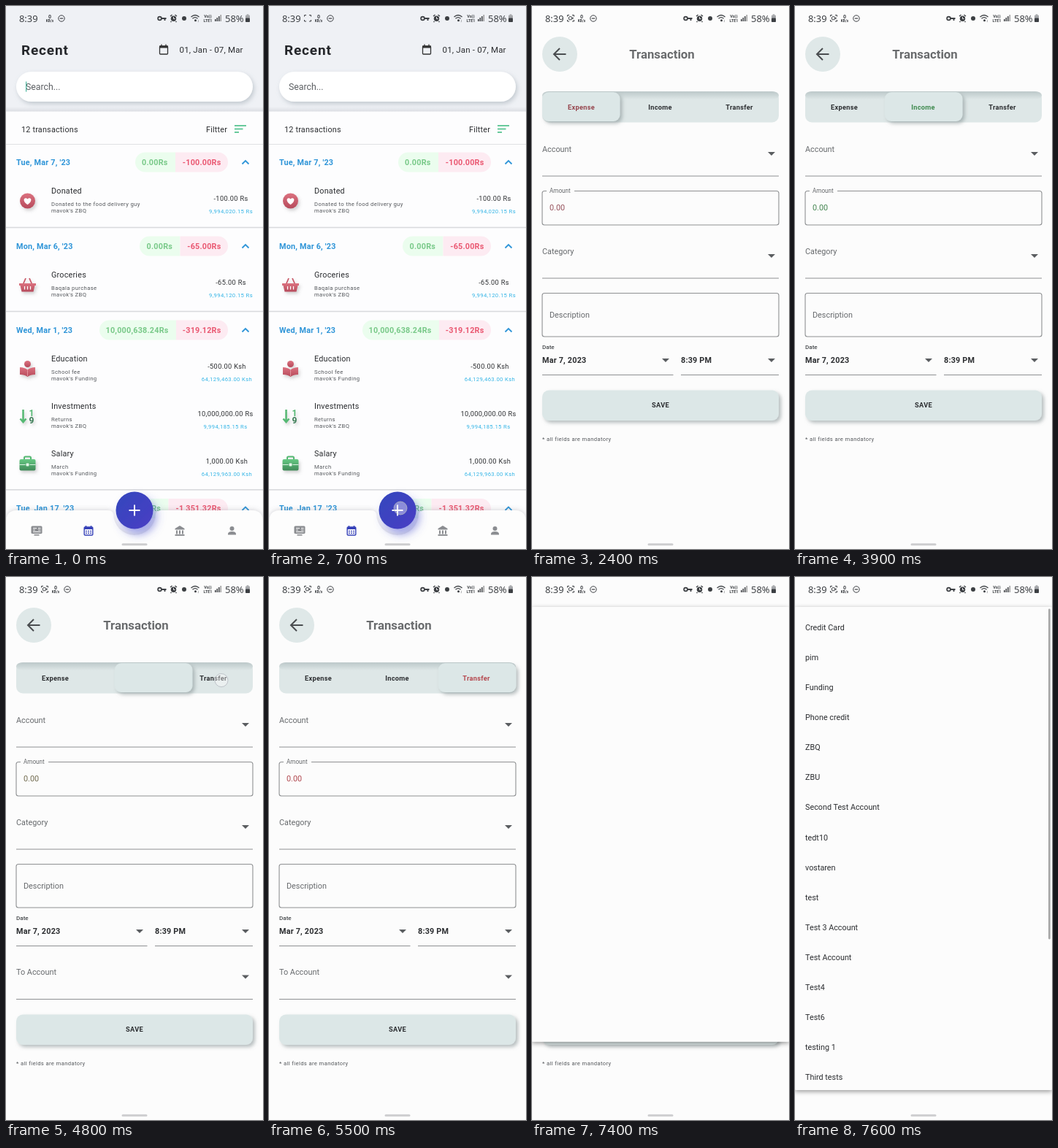
Recreate the animation shown at these times as an HTML page. Size 352 by 744 pixels, loop 8000 ms.

```html
<!DOCTYPE html>
<html lang="en">
<head>
<meta charset="utf-8">
<title>Expense tracker</title>
<style>
html, body { margin: 0; width: 100%; height: 100%; overflow: hidden; background: #fcfcfc; }
svg { display: block; width: 352px; height: 744px; font-family: Roboto, sans-serif; }
text { white-space: pre; }
.home, .form, .pill, .live, .hit, .kb, .crop, .rec, .dnd, .caret, .amount, .extra, .foot, .menu, .sheet, .item {
  animation: 8s linear infinite both;
}
.kb, .crop, .rec, .dnd, .caret, .extra, .foot, .hit { animation-timing-function: step-end; }

/* page push */
.home { animation-name: home; }
.form { animation-name: form; }
@keyframes home {
  0%, 9% { transform: none; animation-timing-function: cubic-bezier(.35,.91,.33,.97); }
  12.75%, 100% { transform: translateX(-117px); }
}
@keyframes form {
  0%, 9% { transform: translateX(358px); animation-timing-function: cubic-bezier(.35,.91,.33,.97); }
  12.75%, 100% { transform: none; }
}

/* status icons swap places */
.kb { animation-name: kb; }
.crop { animation-name: crop; }
.rec { animation-name: rec; }
.dnd { animation-name: dnd; }
.caret { animation-name: caret; }
@keyframes kb {
  0% { transform: translateX(60px); }
  1.25% { transform: translateX(68px); }
  11.875% { transform: translateX(53px); }
  16.875%, 100% { transform: translateX(68px); }
}
@keyframes crop {
  0% { transform: translateX(53px); opacity: 0; }
  1.25% { transform: translateX(53px); opacity: 1; }
  11.875% { transform: translateX(68px); opacity: 1; }
  16.875%, 100% { transform: translateX(53px); opacity: 1; }
}
@keyframes rec { 0% { opacity: 0; } 16.875%, 100% { opacity: 1; } }
@keyframes dnd { 0% { transform: translateX(76px); } 1.25%, 100% { transform: translateX(84px); } }
@keyframes caret { 0% { opacity: 1; } 2.5%, 100% { opacity: 0; } }

/* tab switch */
.pill { animation-name: pill; }
@keyframes pill {
  0%, 38.75% { transform: none; animation-timing-function: ease-in-out; }
  42.125%, 58.875% { transform: translateX(109px); animation-timing-function: ease-in-out; }
  62.25%, 100% { transform: translateX(218px); }
}
.live0 { animation-name: live0; }
.live1 { animation-name: live1; }
.live2 { animation-name: live2; }
@keyframes live0 { 0%, 38.75% { opacity: 1; } 39.5%, 100% { opacity: 0; } }
@keyframes live1 { 0%, 41.25% { opacity: 0; } 42.5%, 58.75% { opacity: 1; } 59.5%, 100% { opacity: 0; } }
@keyframes live2 { 0%, 61.25% { opacity: 0; } 62.5%, 100% { opacity: 1; } }
.amount { animation-name: amount; }
@keyframes amount {
  0%, 38.75% { fill: #95505a; }
  42.5%, 58.75% { fill: #438550; }
  61.75%, 100% { fill: #b0474e; }
}
.extra { animation-name: extra; }
.foot { animation-name: foot; }
@keyframes extra { 0% { opacity: 0; } 59.5%, 100% { opacity: 1; } }
@keyframes foot { 0% { transform: none; } 59.5%, 100% { transform: translateY(73px); } }

/* taps */
.hit0 { animation-name: hit0; }
.hit1 { animation-name: hit1; }
.hit2 { animation-name: hit2; }
.hit3 { animation-name: hit3; }
@keyframes hit0 { 0% { opacity: 0; } 7.5% { opacity: 1; } 9.75%, 100% { opacity: 0; } }
@keyframes hit1 { 0% { opacity: 0; } 38.5% { opacity: 1; } 40.625%, 100% { opacity: 0; } }
@keyframes hit2 { 0% { opacity: 0; } 58.75% { opacity: 1; } 61.25%, 100% { opacity: 0; } }
@keyframes hit3 { 0% { opacity: 0; } 88.75% { opacity: 1; } 90.625%, 100% { opacity: 0; } }

/* account menu: fade, grow, then list its rows */
.menu { animation-name: menu; }
.sheet { animation-name: sheet; }
.item { animation-name: item; }
@keyframes menu { 0%, 91% { opacity: 0; } 91.94%, 100% { opacity: 1; } }
@keyframes sheet {
  0%, 91.94% { height: 41px; animation-timing-function: ease; }
  92.875%, 100% { height: 662px; }
}
@keyframes item { 0%, 93% { opacity: 0; } 93.3%, 100% { opacity: 1; } }
</style>
</head>
<body>
<svg id="stage" viewBox="0 0 352 744" xmlns="http://www.w3.org/2000/svg"></svg>
<script>
const INK = '#2b2d30', BLUE = '#2f95d8', RED = '#c95a69', GREEN = '#55b873';

// y is the middle of the capitals
const text = (x, y, str, size, o = {}) =>
  `<text x="${x}" y="${(y + size * .355).toFixed(2)}" font-size="${size}" fill="${o.fill || INK}"` +
  ` font-weight="${o.bold ? 700 : o.weight || 400}" letter-spacing="${o.gap || 0}"` +
  ` text-anchor="${o.at || 'start'}"${o.cls ? ` class="${o.cls}"` : ''}` +
  `${o.font ? ` font-family="${o.font}"` : ''}>${str}</text>`;
const body = (x, y, str, o) => text(x, y, str, 10.8, { gap: .21, ...o });
const tiny = (x, y, str, o) => text(x, y, str, 7.7, { gap: .36, fill: '#55585c', ...o });
const rect = (x, y, w, h, r, fill, more = '') =>
  `<rect x="${x}" y="${y}" width="${w}" height="${h}" rx="${r}" fill="${fill}" ${more}/>`;
const circle = (x, y, r, fill, more = '') => `<circle cx="${x}" cy="${y}" r="${r}" fill="${fill}" ${more}/>`;
const path = (d, fill, more = '') => `<path d="${d}" fill="${fill}" ${more}/>`;
const line = (d, color, w = 1, more = '') => path(d, 'none', `stroke="${color}" stroke-width="${w}" ${more}`);
const at = (x, y, inner, more = '') => `<g transform="translate(${x} ${y})" ${more}>${inner}</g>`;

const shadow = (id, dx, dy, blur, color, alpha) =>
  `<filter id="${id}" x="-40%" y="-60%" width="180%" height="240%">
   <feDropShadow dx="${dx}" dy="${dy}" stdDeviation="${blur}" flood-color="${color}" flood-opacity="${alpha}"/></filter>`;
const ramp = (id, a, b, x2 = 0, y2 = 1) =>
  `<linearGradient id="${id}" x1="0" y1="0" x2="${x2}" y2="${y2}">
   <stop stop-color="${a}"/><stop offset="1" stop-color="${b}"/></linearGradient>`;

const defs = `<defs>
  ${shadow('soft', 2, 3, 3, '#8a98a0', .45)}${shadow('lift', 3, 3, 2.5, '#7d8a8c', .55)}
  ${shadow('glow', 5, 8, 6, '#4a52d0', .5)}${shadow('bar', 0, -1, 3, '#60646c', .25)}
  ${shadow('drop', 0, 2, 3, '#000', .4)}${shadow('icon', 2, 3, 2, '#666', .28)}
  ${ramp('fab', '#3346bd', '#4a3fc4', 1)}${ramp('dent', '#bcc8c9', '#dee7e7')}
  ${ramp('edge', '#eff1f5', '#dcdee3')}${ramp('red', '#dc7280', '#b64a5b')}${ramp('green', '#66c983', '#3f8a58')}
</defs>`;

// status bar
const status = () => {
  const g = '#3c3f43';
  const bars = [3, 5, 7, 9].map((h, i) => rect(286 + i * 2.5, 21 - h, 1.5, h, 0, i < 3 ? g : '#999')).join('');
  return text(18, 17, '8:39', 12.9, { font: "'Noto Sans', sans-serif", fill: g }) +
    `<g class="kb">${text(0, 14.3, '0', 7, { bold: 1, at: 'middle', fill: g })}${text(0, 20.6, 'KB/s', 4.8, { bold: 1, at: 'middle', fill: g })}</g>` +
    `<g class="crop">${line('M-4.5 14.5v-2h2.5M2 12.500h2.500v2M4.500 19v2H2M-2 21h-2.500v-2', g)}` +
    `<g class="rec">${rect(-2.500, 14.700, 4, 4, .8, 'none', `stroke="${g}"`)}${path('M1.500 16.700l2-1.500v3z', g)}</g></g>` +
    `<g class="dnd">${circle(0, 17, 4.2, 'none', `stroke="${g}"`)}${line('M-2.200 17h4.400', g, 1.2)}</g>` +
    circle(210.500, 17, 2.400, 'none', `stroke="${g}" stroke-width="1.700"`) + line('M213 17h6.500M217.500 17v3', g, 1.8) +
    circle(229.500, 17.300, 3.700, g) + line('M225 14l2.500-2M234 14l-2.500-2M226.500 21l-1 1M232.500 21l1 1', g, 1.4) + line('M229.500 15v2.500h2', '#fff', .9) +
    circle(244, 17, 3, g) +
    line('M253.500 15q5.500-5 11 0M255.500 17.200q3.500-3 7 0', g, 1.3) + circle(259.500, 19.800, 1.500, g) + text(262, 20, '↕', 5, { fill: g }) +
    text(276.500, 14, 'Vo))', 5.6, { bold: 1, at: 'middle', fill: g }) + text(276.500, 20.300, 'LTE1', 5.400, { bold: 1, at: 'middle', fill: g }) + bars +
    text(300, 17, '58%', 13, { font: "'Noto Sans', sans-serif", fill: g }) +
    rect(328, 12.500, 6, 9.500, 1, '#a5a7aa') + rect(328, 16.500, 6, 5.500, 1, g) + rect(329.700, 11.300, 2.600, 1.500, 0, '#a5a7aa');
};

// list icons, drawn around 0,0
const icons = {
  heart: circle(0, 0, 10.5, 'url(#red)') + path('M0 5.200C-9-1-3.500-6.500 0-2.500C3.500-6.500 9-1 0 5.200z', '#fff'),
  basket: line('M-6-1L-2.500-9M6-1L2.500-9', RED, 1.800) + path('M-11.500-2h23v3h-1.500l-2 8.500h-16l-2-8.500h-1.500z', 'url(#red)') + line('M-4 2v4.500M0 2v4.500M4 2v4.500', '#fff', 1.3),
  reader: circle(0, -6.500, 4.500, 'url(#red)') + path('M-10.500-2Q-4-2 0 1.500Q4-2 10.500-2V8Q4 8 0 11Q-4 8-10.500 8z', 'url(#red)') + line('M0 2v8', '#e9a4ad', .8),
  sort: line('M-6-9V7M-10 3.500l4 4.500l4-4.500', GREEN, 2.500) + text(5.500, -4.500, '1', 12, { bold: 1, at: 'middle', fill: GREEN }) + text(5.500, 5.500, '9', 12, { bold: 1, at: 'middle', fill: '#3b7d56' }),
  bag: rect(-4.500, -9.500, 9, 7, 1.5, 'none', `stroke="${GREEN}" stroke-width="2"`) + rect(-11, -6, 22, 15.500, 2, 'url(#green)') + line('M-11 1.500h8M3 1.500h8', '#d9f2e0', 1) + rect(-2, -.5, 4, 4, 1, '#e4f6e9'),
};

const chips = (y, x, split, plus, minus) =>
  path(`M${split} ${y - 13.5}H${x + 13.5}a13.500 13.500 0 0 0 0 27H${split}z`, '#ebfdee') +
  path(`M${split} ${y - 13.5}H290.500a13.500 13.500 0 0 1 0 27H${split}z`, '#fdebf2') +
  body(split - 10.5, y, plus, { bold: 1, at: 'end', fill: '#78c988' }) +
  body(294.500, y, minus, { bold: 1, at: 'end', fill: '#ea5872' });

const day = (y, name, ...chip) => body(14, y, name, { bold: 1, fill: BLUE }) + chips(y, ...chip) +
  line(`M323.500 ${y + 2.5}l4.500-4.500l4.500 4.500`, BLUE, 1.800);

const entry = (y, icon, title, note, who, mid, sum, left) =>
  at(29.500, y + 14, icons[icon], 'filter="url(#icon)"') + body(62, y, title) +
  tiny(62, y + 18, note) + tiny(62, y + 27.200, who) +
  text(mid, y + 11, sum, 9.24, { gap: .34, at: 'middle' }) +
  tiny(mid, y + 28.500, left, { at: 'middle', fill: '#35b5e6' });

const rule = y => rect(0, y, 352, 1.6, 0, '#d9dadd');

const navbar = () => {
  const c = '#8b8d91', on = '#3540b8';
  return path('M0 744V707Q0 691 16 691H138Q146 691 147 696A29 29 0 0 0 205 696Q206 691 214 691H336Q352 691 352 707V744z', '#fdfdfd', 'filter="url(#bar)"') +
    circle(176, 691, 25.500, 'url(#fab)', 'filter="url(#glow)"') + line('M168.500 691h15M176 683.500v15', '#fff', 2) +
    at(42, 719, rect(-7.500, -6.500, 15, 10.500, 1.5, c) + rect(-3.500, 5, 7, 1.600, 0, c) + line('M-5-3.500h5M-5-1h3M2-3.500h3.500M2-1h3.500M-5 1.500h10.500', '#fff', 1)) +
    at(113, 719, rect(-5.800, -5, 11.600, 11, 1, 'none', `stroke="${on}" stroke-width="1.400"`) + rect(-6, -5, 12, 3, 0, on) + line('M-3.500-7v3M3.500-7v3', on, 1.4) + line('M-4 .5h8M-4 3.200h8', on, 1.600, 'stroke-dasharray="1.800 1.300"')) +
    at(238, 719, path('M-6.500-3L0-7L6.500-3v1.500h-13z', c) + line('M-4-.5v5M0-.5v5M4-.5v5', c, 2) + rect(-6.500, 5, 13, 1.900, 0, c)) +
    at(309.500, 719, circle(0, -3, 3, c) + path('M-5.500 5.500V4Q-5 1 0 1T5.500 4V5.500z', c));
};

const home = () => `<g class="home">` +
  rect(0, 0, 352, 744, 0, '#fdfdfe') + rect(0, 0, 352, 138, 0, '#eff1f5') + rect(0, 138, 352, 6.500, 0, 'url(#edge)') +
  text(21, 60.500, 'Recent', 19, { bold: 1, gap: .85, fill: '#25272b' }) +
  rect(210.500, 55, 11, 11, 1, 'none', 'stroke="#333" stroke-width="1.300"') + rect(210, 54.500, 12, 3, 0, '#333') + line('M213 52.500v3M219 52.500v3', '#333', 1.3) +
  text(237.500, 60, '01, Jan - 07, Mar', 11.5, { gap: .18 }) +
  rect(14, 90, 324, 41, 20.5, '#fff', 'filter="url(#soft)"') + text(27, 110.500, 'Search...', 12.3, { fill: '#5c5f63' }) +
  rect(27, 103.500, 1.200, 14, 0, '#4fb8a0', 'class="caret"') +
  body(21, 169, '12 transactions') + body(274, 169, 'Filtter') +
  line('M313 164h16M313 168.500h11.500M313 173h6', '#68c99c', 1.800) + rect(0, 189, 352, 1, 0, '#e0e1e4') +
  day(214, "Tue, Mar 7, '23", 177, 232, '0.00Rs', '-100.00Rs') +
  entry(253, 'heart', 'Donated', 'Donated to the food delivery guy', "mavok's ZBQ", 308, '-100.00 Rs', '9,994,020.15 Rs') + rule(302.700) +
  day(329, "Mon, Mar 6, '23", 183, 238.500, '0.00Rs', '-65.00Rs') +
  entry(368, 'basket', 'Groceries', 'Baqala purchase', "mavok's ZBQ", 308, '-65.00 Rs', '9,994,120.15 Rs') + rule(417.700) +
  day(444, "Wed, Mar 1, '23", 128, 233, '10,000,638.24Rs', '-319.12Rs') +
  entry(483, 'reader', 'Education', 'School fee', "mavok's Funding", 302.500, '-500.00 Ksh', '64,129,463.00 Ksh') +
  entry(548, 'sort', 'Investments', 'Returns', "mavok's ZBQ", 300.500, '10,000,000.00 Rs', '9,994,185.15 Rs') +
  entry(613, 'bag', 'Salary', 'March', "mavok's Funding", 302.500, '1,000.00 Ksh', '64,129,963.00 Ksh') + rule(662) +
  day(688.500, "Tue, Jan 17, '23", 167, 222.500, '0.00Rs', '-1,351.32Rs') + navbar() + '</g>';

// form page
const arrow = (x, y) => path(`M${x - 5} ${y - 2.5}h10l-5 5z`, '#5a5d60');
const under = (y, x = 14, end = 338) => rect(x, y, end - x, 1, 0, '#8e9092');
const label = (x, y, str) => text(x, y, str, 10.85, { fill: '#66696c' });
const outline = (y, h) => rect(14, y, 324, h, 3, 'none', 'stroke="#8e9092" stroke-width="1.100"');
const picker = (y, str) => label(14, y, str) + arrow(328, y + 6.5) + under(y + 36.500);

const tabs = () => {
  const names = ['Expense', 'Income', 'Transfer'], mids = [67.5, 175.5, 284], tint = ['#95454d', '#3f8a4f', '#b5474e'];
  const row = f => names.map(f).join('');
  const tab = (n, i, o) => text(mids[i], 138.500, n, 9.24, { bold: 1, gap: .27, at: 'middle', ...o });
  return rect(14, 117, 324, 42.500, 9, '#dee7e7') + rect(14, 117, 324, 11, 9, 'url(#dent)') +
    row((n, i) => tab(n, i)) +
    `<g class="pill">${rect(14, 118, 106.500, 40, 9, '#dce7e7', 'filter="url(#lift)"')}</g>` +
    row((n, i) => tab(n, i, { fill: tint[i], cls: `live live${i}` }));
};

const form = () => `<g class="form">` +
  rect(0, 0, 360, 744, 0, '#fcfcfc') + circle(38, 66, 24, '#dfe8e8') +
  line('M46.500 66H30.500M38 58l-8 8l8 8', '#4a4d50', 2) +
  text(178, 66, 'Transaction', 16.8, { bold: 1, at: 'middle', fill: '#696b6d' }) + tabs() +
  picker(196, 'Account') +
  outline(253.500, 46.500) + rect(20, 250, 38, 7, 0, '#fcfcfc') + text(24, 253, 'Amount', 8.15, { fill: '#66696c' }) +
  text(24, 276, '0.00', 10.8, { cls: 'amount' }) +
  picker(336, 'Category') + outline(393.500, 59.500) + label(24, 423, 'Description') +
  text(14, 467.500, 'Date', 8.1, { weight: 500, fill: '#45484b' }) +
  body(14, 485.500, 'Mar 7, 2023', { bold: 1 }) + body(204, 485.500, '8:39 PM', { bold: 1 }) +
  arrow(183, 485.500) + arrow(328, 485.500) + under(505, 14, 193.500) + under(505, 204) +
  `<g class="extra">${picker(541.500, 'To Account')}</g>` +
  `<g class="foot">${rect(14, 526.500, 324, 41.500, 9, '#dce7e7', 'filter="url(#lift)"')}` +
  text(176, 547, 'SAVE', 9.24, { bold: 1, gap: .25, at: 'middle' }) +
  tiny(14, 593.500, '* all fields are mandatory') + '</g></g>';

const accounts = ['Credit Card', 'pim', 'Funding', 'Phone credit', 'ZBQ', 'ZBU', 'Second Test Account', 'tedt10',
  'vostaren', 'test', 'Test 3 Account', 'Test Account', 'Test4', 'Test6', 'testing 1', 'Third tests'];

const menu = () => `<g class="menu">` +
  rect(0, 41, 352, 662, 1.5, '#fcfcfc', 'class="sheet" filter="url(#drop)"') +
  accounts.map((n, i) => `<g class="item" style="animation-delay:${i * 8}ms">${text(14, 69 + i * 41.1, n, 10.8)}</g>`).join('') +
  `<g class="item">${rect(347, 43.500, 2.800, 453, 1.4, '#a9a9a9')}</g></g>`;

const taps = () => [[180, 688], [180, 141], [295, 141.5], [285, 202]].map(([x, y], i) =>
  circle(x, y, 9, '#fff', `fill-opacity=".4" stroke="#b4b8c0" stroke-opacity=".8" class="hit hit${i}"`)).join('');

document.getElementById('stage').innerHTML =
  defs + home() + form() + menu() + status() + rect(158.500, 736.200, 35, 3, 1.5, '#cdcdcf') + taps();
</script>
</body>
</html>
```
